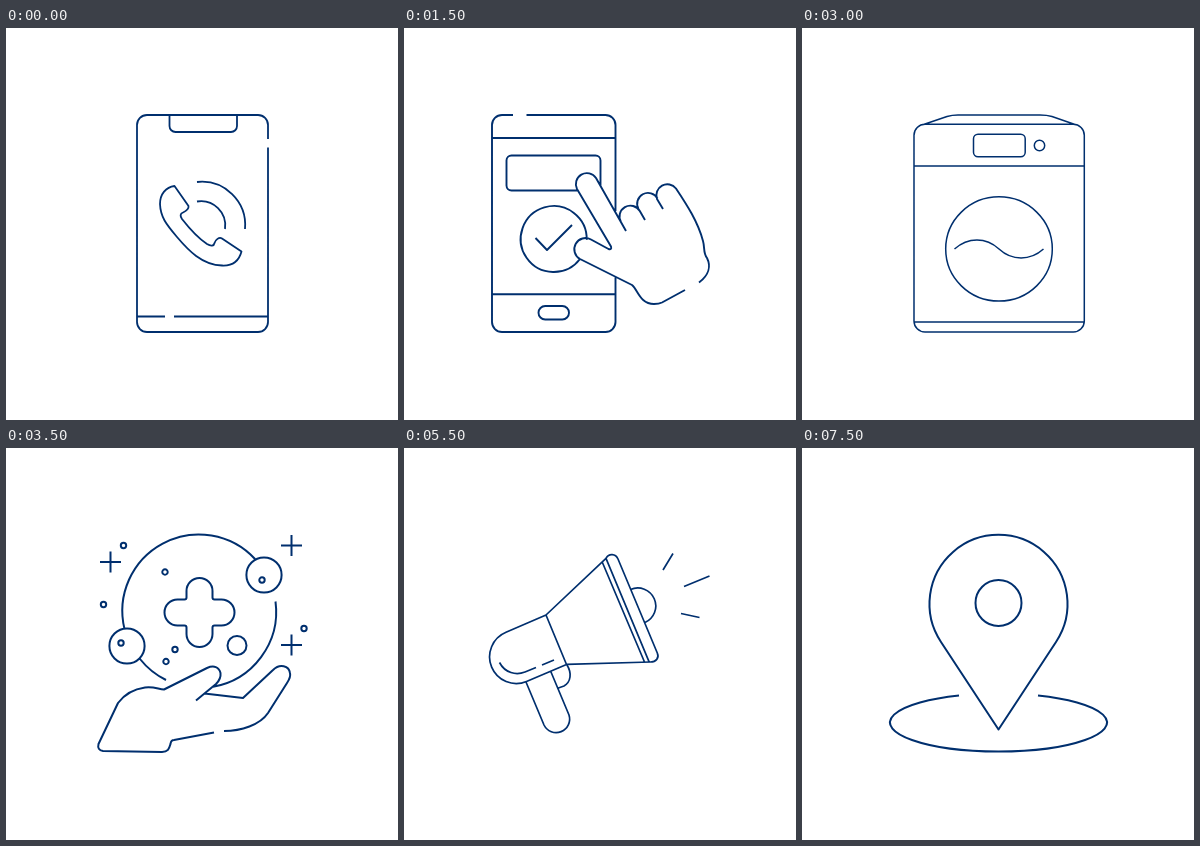
Animation, 392 px wide and 392 px high, one loop 8000 ms. Source, as an HTML page with a canvas:

```html
<!DOCTYPE html>
<html lang="en">
<head>
<meta charset="utf-8">
<title>Line icons</title>
<style>
html, body { margin: 0; width: 100%; height: 100%; overflow: hidden; background: #fff; }
canvas { display: block; width: 392px; height: 392px; }
</style>
</head>
<body>
<canvas id="stage"></canvas>
<script>
const SIZE = 392, STEP = 500, INK = '#002f6e';

// Path helpers
const ellipse = (x, y, rx, ry) =>
  `M${x - rx} ${y}a${rx} ${ry} 0 1 1 ${2 * rx} 0a${rx} ${ry} 0 1 1 ${-2 * rx} 0Z`;
const circle = (x, y, r) => ellipse(x, y, r, r);
const plus = (x, y, r) => `M${x - r} ${y}h${2 * r}M${x} ${y - r}v${2 * r}`;
const box = (x, y, w, h, r) =>
  `M${x + r} ${y}h${w - 2 * r}a${r} ${r} 0 0 1 ${r} ${r}v${h - 2 * r}a${r} ${r} 0 0 1 ${-r} ${r}` +
  `h${2 * r - w}a${r} ${r} 0 0 1 ${-r} ${-r}v${2 * r - h}a${r} ${r} 0 0 1 ${r} ${-r}Z`;
const dots = list => list.map(([x, y]) => circle(x, y, 2.7)).join('');
const icon = (width, ...parts) => ({ width, path: new Path2D(parts.join('')) });

const icons = {
  call: icon(1.8,
    'M262 111V97a10 10 0 0 0-10-10H141a10 10 0 0 0-10 10V294a10 10 0 0 0 10 10H252a10 10 0 0 0 10-10V119.5',
    'M163.5 87V98a6 6 0 0 0 6 6H225a6 6 0 0 0 6-6V87',
    'M131 288.5H159M168 288.5H262',
    'M168.5 158L182.5 178C183 181 180 183 177 184.5C174 185.5 174 188 176 191C183 200 192 210 201 216',
    'C205 218.5 208 218 208.5 215C209.5 212 213 208.5 216 210.5L235.5 223.5C233 233 226 238 216 237.5',
    'C196 237 182 222 171 209C160 196 154.5 189 154 176C154 166 160 159 168.5 158Z',
    'M191 154A43.5 43.5 0 0 1 239 201M191 173.5A24.3 24.3 0 0 1 219 201'),

  tap: icon(1.9,
    'M122.5 87H201.5a10 10 0 0 1 10 10V183M211.5 249.5V294a10 10 0 0 1-10 10H98a10 10 0 0 1-10-10V97a10 10 0 0 1 10-10H109',
    'M88 110H211.5M88 266.2H211.5',
    'M173.5 162.5H107.5a5 5 0 0 1-5-5V132.500a5 5 0 0 1 5-5H191.500a5 5 0 0 1 5 5V157.500',
    'M182.700 212A33 33 0 1 0 176 231M131.500 210L143 222L168 197',
    box(134.5, 278, 30.5, 13.500, 6.700),
    'M222 203L192 150A11 11 0 0 0 173 161L207 218.5Q208 222 204.5 221L187 211.5A11 11 0 0 0 176 231',
    'L228 257C234 262 236 276 250 276Q255 276 258 274.5L281 262',
    'M295 254.5C305 247 307 238 303 230C299 225 301 220 299 213C294 194 283 177 272 160.5',
    'A11 11 0 0 0 253 171L259 181',
    'M217 194A10.8 10.8 0 0 1 235.800 183L241 192M234.5 181A10.5 10.5 0 0 1 253.5 170.5'),

  coin: icon(1.6,
    circle(219, 130, 43.2), 'M219 99.5V161',
    'M233 118C233 110 227 106 219 106C211 106 205.5 111 205.5 118C205.5 125 211 128 219 130',
    'C228 132 234 135 234 142C234 150 228 154 219 154C210 154 204.5 150 204.5 142.5',
    'M90 248L106 232C113 225 124 225 131 232L161 262C168 269 168 281 162 288L146 304Z',
    'M126 228C134 220 151 202 158 199.500C168 198 180 200 189 203Q193 204 200 204H242A12 12 0 0 1 242 228H204M194 228H182',
    'M253 213.5L282.500 182A12 12 0 0 1 300 198L252.500 249.500Q249 254 242 254H184C177 254 175 257 172 261L166 267.5'),

  care: icon(2,
    'M118.5 181A76.5 76.5 0 0 1 249 111M269.500 153.500A76.5 76.5 0 0 1 206 239M134 211A76.5 76.5 0 0 0 160 232',
    circle(258, 127, 17.6), circle(121, 198, 17.6), circle(231, 197.5, 9.5),
    dots([[115, 195], [256, 132], [117.5, 97.5], [97.5, 156.5], [159, 124], [169, 201.5], [160, 213.5], [298, 180.5]]),
    plus(104.5, 114, 10.500), plus(285.5, 97.5, 10.5), plus(285.5, 197, 10.5),
    'M180.5 149.5V143a13 13 0 0 1 26 0v6.500q0 2 2 2h7a13 13 0 0 1 0 26h-7q-2 0-2 2v6.500a13 13 0 0 1-26 0v-6.500',
    'q0-2-2-2h-7a13 13 0 0 1 0-26h7q2 0 2-2Z',
    'M208 284.500L168 292Q165 292 164.5 296C163 301 162 304 156 304L97 303Q91 302 92.5 296L112 255',
    'C118 247 128 241 139 239.5C148 238.500 152 241 158 241.5L201 220C208 217 213 219 214.5 225',
    'C215 229 213 233 210 236L190 252.5',
    'M198.5 245.5L237 250L267 222C274 215 283 218 284 225C285 229 283 232 281 235L262 265C254 277 235 283 218 283'),

  washer: icon(1.5,
    box(112, 96.3, 170.3, 207.7, 11),
    'M121.500 96.5L145 88.5Q150 87 156 87H238Q245 87 250 88.5L273 96.5M112 138H282M112 294H282',
    box(171.5, 106.3, 51.7, 22.5, 4.5), circle(237.5, 117.5, 5.2), ellipse(197, 221, 53.3, 52.1),
    'M152.5 221C166 209 184 209 197 221C210 233 228 233 241.5 221'),

  horn: icon(1.7,
    'M142 167L102 184.3A26.5 26.5 0 0 0 122.5 233.5L162.5 216.5ZM95.500 214.5C101 225 112 227.500 121 224L132 219.5M138 217L150 212',
    'M142 167L202 110.3C205 105 211.500 105.500 214 111L253.300 205C255.500 210 252 214 246.500 214L162.500 216.300',
    'M198.2 114L240.5 214M202 110.3L245 213.700M226.500 141.5A17.7 17.7 0 0 1 241 174.5',
    'M259 122L269 105.5M280 138.5L305.5 128M277 165.5L295.5 169.5',
    'M122 234L140 277A13.5 13.5 0 0 0 165 267L147 224M163 217C168 225 167 234 160 238L153 240.5'),

  pin: icon(2,
    'M196.5 281.5L139 194A69 69 0 1 1 254 194Z', circle(196.5, 155, 23),
    'M157 247.5A108.5 29 0 1 0 236 247.5')
};

const order = ('call horn care tap pin coin washer care tap washer pin horn tap coin horn pin').split(' ');

const canvas = document.getElementById('stage');
const ctx = canvas.getContext('2d');
const ratio = window.devicePixelRatio || 1;
canvas.width = canvas.height = Math.round(SIZE * ratio);
ctx.scale(ratio, ratio);

function draw(ms) {
  const { width, path } = icons[order[Math.floor(ms / STEP) % order.length]];
  ctx.fillStyle = '#fff';
  ctx.fillRect(0, 0, SIZE, SIZE);
  ctx.strokeStyle = INK;
  ctx.lineWidth = width;
  ctx.lineJoin = 'round';
  ctx.stroke(path);
}

let start = null;
function tick(now) {
  if (start === null) start = now;
  draw(Math.max(0, now - start));
  requestAnimationFrame(tick);
}
draw(0);
requestAnimationFrame(tick);
</script>
</body>
</html>
```
